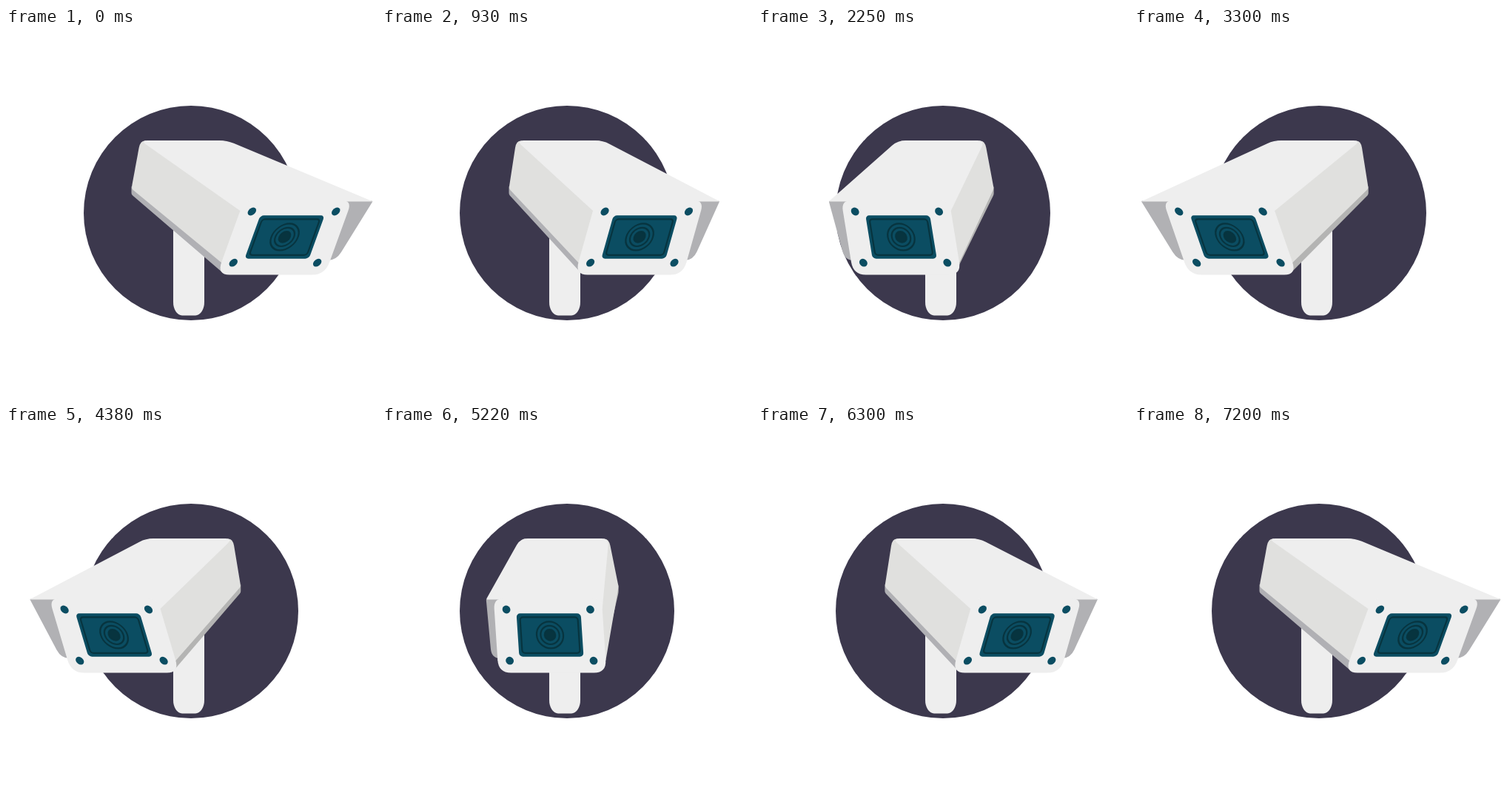
An HTML page for the animation above (7.26 s loop, 500 by 500 pixels).

```html
<!DOCTYPE html>
<html lang="en">
<head>
<meta charset="utf-8">
<title>Security camera</title>
<style>
  html, body { margin: 0; width: 100%; height: 100%; overflow: hidden; background: #fff; }
  svg { display: block; width: 100%; height: 100%; }
</style>
</head>
<body>
<svg viewBox="0 0 500 500">
  <circle cx="250" cy="250" r="145" fill="#3c384d"/>
  <path d="M226 230H268V370A12 18 0 0 1 256 388.5H238A12 18 0 0 1 226 370Z" fill="#eee"/>
  <path id="stripL" fill="#b0b0b4"/>
  <path id="stripR" fill="#b4b4b3"/>
  <path id="sideL" fill="#e0e0de"/>
  <path id="sideR" fill="#e0e0de"/>
  <path id="visorL" fill="#b1b1b4"/>
  <path id="visorR" fill="#b1b1b4"/>
  <path id="roof" fill="#eee"/>
  <g id="face">
    <path d="M-60 -49H60Q73 -49 73 -35V34Q73 51.5 56 51.5H-56Q-73 51.5 -73 34V-35Q-73 -49 -60 -49Z" fill="#eee"/>
    <g fill="#0b4d62">
      <circle cx="-56.7" cy="-34" r="5.4"/>
      <circle cx="56.7" cy="-34" r="5.4"/>
      <circle cx="-56.7" cy="35.2" r="5.4"/>
      <circle cx="56.7" cy="35.2" r="5.4"/>
      <rect x="-43.5" y="-28.7" width="87" height="58.5" rx="5"/>
    </g>
    <g fill="none" stroke="#07343f" stroke-width="2.2">
      <rect x="-39" y="-23.7" width="78" height="48.5" rx="4"/>
      <g transform="translate(0 .4)">
        <circle r="18"/>
        <circle r="12.6"/>
        <circle r="7.2" fill="#07343f"/>
      </g>
    </g>
  </g>
</svg>
<script>
const LOOP = 7260, SWING = 3600, STEP = 30;
const LEFT_END = -0.973;
const el = id => document.getElementById(id);
const clamp = v => Math.max(0, Math.min(1, v));

// cubic-bezier(.5, 0, .5, 1)
function ease(u) {
  let lo = 0, hi = 1;
  for (let i = 0; i < 24; i++) {
    const v = (lo + hi) / 2;
    if (1.5 * v - 1.5 * v * v + v * v * v < u) lo = v; else hi = v;
  }
  return lo * lo * (3 - 2 * lo);
}

// Closed path through [x, y, corner size] points
function outline(points) {
  const n = points.length;
  const toward = (a, b, size) => {
    const dx = b[0] - a[0], dy = b[1] - a[1];
    const k = Math.min(0.5, size / (Math.hypot(dx, dy) || 1));
    return `${(a[0] + dx * k).toFixed(2)} ${(a[1] + dy * k).toFixed(2)}`;
  };
  return points.map((p, i) => {
    const r = p[2] || 0;
    const start = toward(p, points[(i + n - 1) % n], r);
    const end = toward(p, points[(i + 1) % n], r);
    return `${i ? "L" : "M"}${start}Q${p[0].toFixed(2)} ${p[1].toFixed(2)} ${end}`;
  }).join("") + "Z";
}

const setShape = (id, points) => el(id).setAttribute("d", points ? outline(points) : "");

// turn: 1 looks right, -1 looks left
function draw(turn) {
  const skew = -0.363 * turn, center = 250 + 126.7 * turn;
  el("face").setAttribute("transform", `matrix(1 0 ${skew} 1 ${center} 282)`);

  const rear = {
    L: 181.5 + 7.5 * clamp(-turn * 4),
    R: 306.5 - 8 * clamp(turn * 4)
  };
  const heel = { L: 169.5 + 9 * (1 - turn), R: 320.3 + 3.7 * turn };
  const tip = { L: 171.5 + 170 * turn, R: 320.5 + 175.5 * turn };
  const roofEnd = {};

  for (const side of ["L", "R"]) {
    const s = side === "L" ? -1 : 1;
    const edge = y => center + 73 * s + skew * (y - 282);
    const hooded = s * (tip[side] - edge(236)) > 0;
    roofEnd[side] = hooded ? [tip[side], 234.5, 2] : [edge(247), 247];

    setShape("side" + side, [
      [rear[side], 152, 10], [heel[side], 217, 3],
      [edge(317), 317], [edge(317) - 6 * s, 317],
      [edge(247) - 6 * s, 247], [rear[side] - 14 * s, 153]
    ]);
    setShape("strip" + side, [
      [heel[side], 214], [heel[side], 225, 2],
      [edge(333) - 8 * s, 331], [edge(310) - 8 * s, 310]
    ]);
    setShape("visor" + side, hooded && [
      [tip[side], 233.5, 2], [edge(314) + 8 * s, 314, 13],
      [edge(314) - 15 * s, 314], [edge(234) - 30 * s, 233.5]
    ]);
  }

  setShape("roof", [
    [rear.L, 152, 10], [rear.R, 152, 10], roofEnd.R,
    [center + 30, roofEnd.R[1]], [center - 30, roofEnd.L[1]], roofEnd.L
  ]);
}

const begin = performance.now();

function frame(now) {
  const elapsed = Math.max(0, now - begin) % LOOP;
  const t = Math.min(2 * SWING, Math.floor(elapsed / STEP) * STEP);
  const progress = 1 - Math.abs(1 - t / SWING);
  draw(1 + (LEFT_END - 1) * ease(progress));
  requestAnimationFrame(frame);
}

frame(begin);
</script>
</body>
</html>
```
